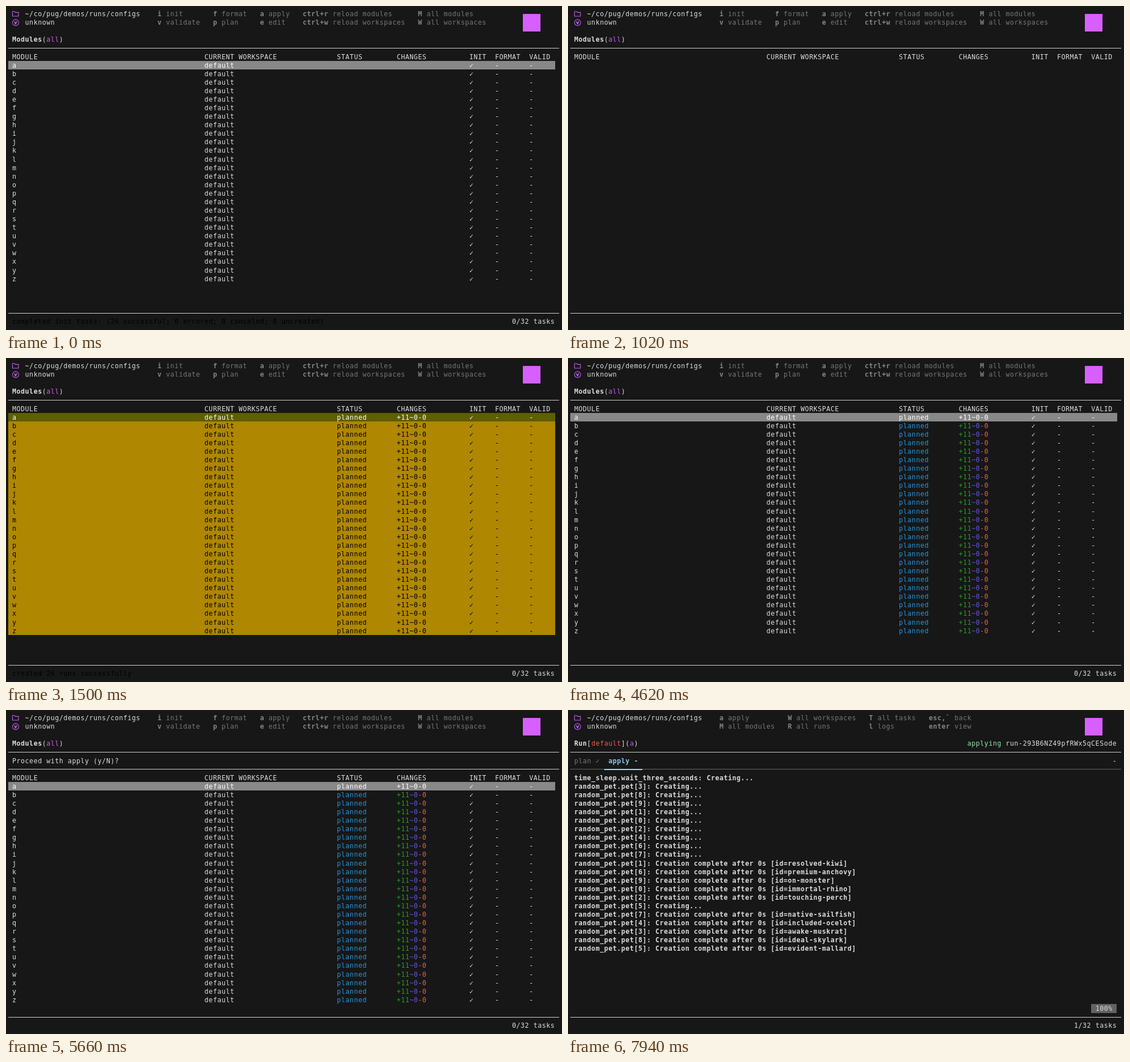
An HTML page for the animation above (8000 ms loop, 980 by 572 pixels).

```html
<!DOCTYPE html>
<html lang="en">
<head>
<meta charset="utf-8">
<title>Terminal</title>
<style>
  html, body { margin: 0; width: 100%; height: 100%; overflow: hidden; background: #171717; }
  #stage {
    position: relative; width: 980px; height: 572px; overflow: hidden;
    background: #171717; color: #ddd;
    font: 11.63px/15.08px "DejaVu Sans Mono", "Noto Sans Mono", monospace;
    letter-spacing: .53px; white-space: pre; font-variant-ligatures: none;
  }
  #stage div, #stage svg { position: absolute; }
  .text { margin-top: .4px; }
  b { font-weight: 700; }
  .key { color: #858585; font-weight: 700; }
  .dim { color: #777; }
  .pink { color: #c95cf0; }
  .red { color: #e8604c; }
  .green { color: #22a022; }
  .violet { color: #5f55e8; }
  .blue { color: #2496dc; }
  .mint { color: #8fe8b4; }
  .tab { color: #86c5ea; font-weight: 700; }
  .log { color: #dcdcdc; font-weight: 700; }
  .white { color: #fff; }
  .black { color: #000; }
</style>
</head>
<body>
<div id="stage"></div>
<script>
const CELL = 7.53, LINE = 15.08, LEFT = 11, TOP = 6.76, LOOP = 8000;
const stage = document.getElementById("stage");

const x = col => LEFT + col * CELL;
const y = row => TOP + row * LINE;
const tag = (cls, s) => `<span class="${cls}">${s}</span>`;
const text = (col, row, s, cls = "") =>
  `<div class="text ${cls}" style="left:${x(col)}px;top:${y(row)}px">${s}</div>`;
const right = (row, s, cls, len) => text(127 - len, row, s, cls);
const box = (left, top, width, height, color) =>
  `<div style="left:${left}px;top:${top}px;width:${width}px;height:${height}px;background:${color}"></div>`;
const rule = (row, color = "#d0d0d0") => box(4, Math.floor(y(row) + LINE / 2), 971, 1, color);

const icons = `<svg width="30" height="42" fill="none" stroke="#c95cf0" stroke-width="1.1">
  <path d="M11.5 18V9.7h3.8l1.4 1.7h5.3V18z"/>
  <circle cx="16.9" cy="29.3" r="5.4"/>
  <path d="M14.8 27l2.1 4.6 2.1-4.6" stroke-width="1.7"/></svg>`;

// Each group: key column, label column, then two rows of key and label
const mainKeys = [
  [34, 36, "i", "init", "v", "validate"],
  [47, 49, "f", "format", "p", "plan"],
  [58, 60, "a", "apply", "e", "edit"],
  [68, 75, "ctrl+r", "reload modules", "ctrl+w", "reload workspaces"],
  [95, 97, "M", "all modules", "W", "all workspaces"]
];
const runKeys = [
  [34, 36, "a", "apply", "M", "all modules"],
  [50, 52, "W", "all workspaces", "R", "all runs"],
  [69, 71, "T", "all tasks", "l", "logs"],
  [83, 89, "esc,`", "back", "enter", "view"]
];

const pet = n => `random_pet.pet[${n}]: `;
const creating = n => pet(n) + "Creating...";
const created = s => pet(s[0]) + `Creation complete after 0s [id=${s.slice(2)}]`;
const log = [
  "time_sleep.wait_three_seconds: Creating...",
  ..."389102467".split("").map(creating),
  ...["1 resolved-kiwi", "6 premium-anchovy", "9 on-monster",
      "0 immortal-rhino", "2 touching-perch"].map(created),
  creating(5),
  ...["7 native-sailfish", "4 included-ocelot", "3 awake-muskrat",
      "8 ideal-skylark", "5 evident-mallard"].map(created)
];

function frame(keys, title) {
  const help = keys.map(([k, l, k1, l1, k2, l2]) =>
    text(k, 0, k1, "key") + text(l, 0, l1, "dim") +
    text(k, 1, k2, "key") + text(l, 1, l2, "dim")).join("");
  return icons + text(3, 0, "~/co/pug/demos/runs/configs") + text(3, 1, "unknown") +
    help + box(911, 14, 31, 31, "#d75fff") + text(0, 3, title) + rule(4) + rule(35);
}

function tasks(n) {
  const s = n + "/32 tasks";
  return right(36, s, "", s.length);
}

// Plans finish in four bursts
const planDone = (i, t) => t >= 1380 + 40 * Math.floor(i * 11 % 26 / 6.5);

function tableRow(i, row, t, selected) {
  const current = i === 0;
  const plain = current || selected;
  const bg = selected ? (current ? "#5f5f00" : "#af8700") : current ? "#888" : "";
  const cls = current ? "white" : selected ? "black" : "";
  const done = planDone(i, t);
  const changes = plain ? "+11~0-0" :
    tag("green", "+11") + tag("violet", "~0") + tag("red", "-0");
  let out = bg ? box(4, y(row), 963.6, LINE + (selected ? .1 : 0), bg) : "";
  out += text(0, row, String.fromCharCode(97 + i), cls) + text(45, row, "default", cls);
  if (t >= 1060) out += text(76, row, done ? "planned" : "planning", plain ? cls : "blue");
  if (done) out += text(90, row, changes, cls);
  return out + text(107, row, "✓", cls) + text(113, row, "-", cls) + text(121, row, "-", cls);
}

function modules(t) {
  const selected = t >= 500 && t < 4620;
  const prompt = t >= 5100;
  const head = prompt ? 7 : 5;
  let out = frame(mainKeys, `<b>Modules</b>(${tag("pink", "all")})`);
  if (prompt) {
    out += text(0, 5, "Proceed with apply (y/N)?") + rule(6);
    if (t < 5660) out += box(x(26), y(5), CELL, LINE, "#ddd");
  }
  [[0, "MODULE"], [45, "CURRENT WORKSPACE"], [76, "STATUS"], [90, "CHANGES"],
   [107, "INIT"], [113, "FORMAT"], [121, "VALID"]]
    .forEach(([col, s]) => out += text(col, head, s));
  if (t >= 1020 && t < 1060) return out;

  let busy = 0;
  for (let i = 0; i < 26; i++) {
    out += tableRow(i, head + 1 + i, t, selected);
    if (t >= 1060 && !planDone(i, t)) busy++;
  }
  if (t < 500)
    out += text(0, 36, "completed init tasks: (26 successful; 0 errored; 0 canceled; 0 uncreated)", "black");
  else if (t >= 1060 && t < 4620)
    out += text(0, 36, "created 26 runs successfully", "black");
  return out + tasks(busy);
}

function spinner(t) {
  const step = t < 7020 ? (t - 6140) / 100
    : t < 7660 ? 9 + Math.min(5, (t - 7020) / 96)
    : 15 + (t - 7660) / 93;
  return "|/-\\"[Math.floor(step) % 4];
}

function run(t) {
  const lines = t < 6740 ? 0 : t < 6840 ? 10 : t < 6940 ? 15 : log.length;
  return frame(runKeys, `<b>Run</b>[${tag("red", "default")}](${tag("pink", "a")})`) +
    right(3, tag("mint", "applying") + " run-293B6NZ49pfRWx5qCESode", "", 35) +
    text(0, 5, "plan ✓", "dim") + text(8, 5, "apply " + spinner(t), "tab") +
    right(5, "-", "", 1) +
    rule(6, "#666") + box(x(7), 103.5, 9 * CELL, 2, "#b4d4e6") +
    log.slice(0, lines).map((s, i) => text(0, 7 + i, s, "log")).join("") +
    box(x(121), y(34), 6 * CELL, LINE, "#626262") + text(122, 34, "100%") +
    tasks(1);
}

let shown = "";
const start = performance.now();
function draw() {
  const t = (performance.now() - start) % LOOP;
  const html = t < 6140 ? modules(t) : run(t);
  if (html !== shown) stage.innerHTML = shown = html;
  requestAnimationFrame(draw);
}
draw();
</script>
</body>
</html>
```
